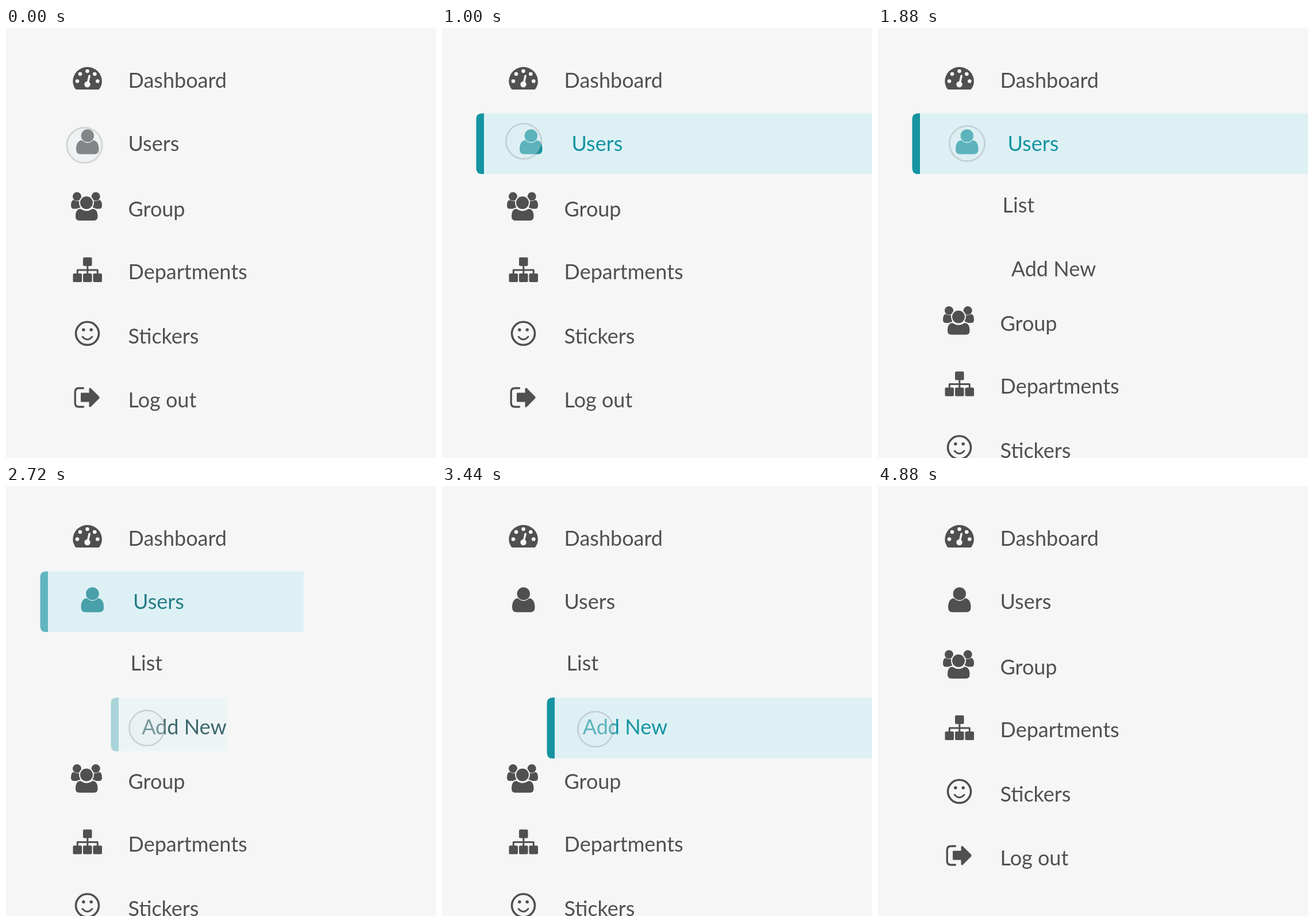
An HTML page that plays this animation: 748 by 748 pixels, repeating every 5.02 s.

```html
<!DOCTYPE html>
<html lang="en">
<head>
<meta charset="utf-8">
<title>Sidebar menu</title>
<style>
  html, body { margin: 0; width: 100%; height: 100%; overflow: hidden; background: #f6f6f6; }
  svg { display: block; width: 100vw; height: 100vh; fill: #505050; font: 36px Lato, sans-serif; }
  .line { fill: none; stroke: #505050; stroke-linecap: round; stroke-linejoin: round; }
  .gap { stroke: #f6f6f6; stroke-width: 2; }
  .hole { fill: #f6f6f6; }
  .bar, #userOn { fill: #1594a1; }
  .wash { fill: #ddf1f5; }
</style>
</head>
<body>
<svg viewBox="0 0 748 748">
  <defs>
    <g id="person">
      <circle cx="141.8" cy="187.4" r="11.2"/>
      <path d="M122 211C122 201 126 195.5 132 195.3Q141.8 204.5 151.5 195.3C157.500 195.500 161.600 201 161.600 211Q161.600 219.500 154 219.500H129.500Q122 219.500 122 211Z"/>
    </g>
  </defs>

  <g id="dashboard">
    <path d="M121.500 107Q116.300 100 116.300 93A25.300 25.300 0 0 1 166.900 93Q166.900 100 161.700 107Z"/>
    <g class="hole">
      <circle cx="124" cy="92.500" r="3.300"/><circle cx="129" cy="80" r="3.300"/>
      <circle cx="141.500" cy="75" r="3.300"/><circle cx="154.300" cy="80" r="3.300"/>
      <circle cx="159.300" cy="92.500" r="3.300"/><circle cx="141.500" cy="98" r="5.200"/>
      <path d="M143.500 82.500Q145.500 80.500 147 83L143.500 98H140Z"/>
    </g>
    <text x="212.500" y="104.300">Dashboard</text>
  </g>

  <rect id="userWash" class="wash" x="73" y="148.500" height="105.500"/>
  <path id="userBar" class="bar" d="M73 148.500H69.500Q59.500 148.500 59.500 158.500V244Q59.500 254 69.500 254H73Z"/>
  <g id="users">
    <use href="#person" id="userOff"/>
    <use href="#person" id="userOn"/>
    <text id="userText" x="212.500" y="214.300">Users</text>
  </g>

  <rect id="addWash" class="wash" x="196" y="368"/>
  <path id="addBar" class="bar"/>
  <g id="submenu">
    <text x="216.500" y="321.300">List</text>
    <text id="addText" y="432.300">Add New</text>
  </g>

  <g id="lower">
    <g id="group">
      <circle cx="123.500" cy="293" r="7.500"/><circle cx="156.200" cy="293" r="7.500"/>
      <path d="M113 309Q113 299 118.500 299.300Q123.500 303 129 300V314.500H118Q113 314.500 113 309Z"/>
      <path d="M167 309Q167 299 161.500 299.300Q156.500 303 151 300V314.500H162Q167 314.500 167 309Z"/>
      <path class="gap" d="M120 328C120 318 124 313.500 130 313.500Q140 321 150 313.500C156 313.500 160.500 318 160.500 328Q160.500 336 153 336H127.500Q120 336 120 328Z"/>
      <circle class="gap" cx="140" cy="304" r="12"/>
      <text x="212.500" y="328.300">Group</text>
    </g>
    <g id="departments">
      <rect x="134" y="399" width="15.500" height="15" rx="2"/>
      <rect x="116.500" y="427" width="15.500" height="15" rx="2"/>
      <rect x="134" y="427" width="15.500" height="15" rx="2"/>
      <rect x="151.500" y="427" width="15.500" height="15" rx="2"/>
      <path class="line" stroke-width="3" d="M141.800 413V428M124.300 428V421H159.300V428"/>
      <text x="212.500" y="437.300">Departments</text>
    </g>
    <g id="stickers">
      <circle class="line" stroke-width="3.600" cx="141.500" cy="531.300" r="20"/>
      <circle cx="134.800" cy="525" r="2.800"/><circle cx="148.200" cy="525" r="2.800"/>
      <path class="line" stroke-width="2.800" d="M133 537Q141.500 546.500 150 537"/>
      <text x="212.500" y="549.300">Stickers</text>
    </g>
    <g id="logout">
      <path class="line" stroke-width="3.400" d="M134.500 626.500H127Q120.200 626.500 120.200 633V652.500Q120.200 659 127 659H134.500"/>
      <path d="M131.500 634.500H144.500V627.500Q145 625 147.500 626.500L162 641Q163.500 642.800 162 644.500L147.500 659Q145 660.500 144.500 658V650.500H131.500Q130 650.500 130 649V636Q130 634.500 131.500 634.500Z"/>
      <text x="212.500" y="660.300">Log out</text>
    </g>
  </g>

  <circle id="cursor" r="30.700" fill="#deecee" fill-opacity=".35" stroke="#808080" stroke-opacity=".28" stroke-width="2.800"/>
</svg>
<script>
const LOOP = 5020, MOVE = 300;
const USERS_HOVER = 357, OPEN = 1350, ADD_HOVER = 2655, CLOSE = 3800;
const GREY = [80, 80, 80], TEAL = [21, 148, 161];

// Pointer path: time, x, y
const path = [
  [0, 136.5, 204], [1000, 142, 197], [1880, 155, 201], [2300, 156, 202],
  [2400, 165, 225], [2500, 188, 285], [2600, 218, 345], [2720, 245, 421],
  [2800, 255, 430], [3000, 264, 425], [3200, 267, 423], [LOOP, 267, 423]
];

const $ = id => document.getElementById(id);
const clamp = v => Math.min(1, Math.max(0, v));
const mix = (a, b, k) => a + (b - a) * k;
const set = (id, attrs) => {
  for (const name in attrs) $(id).setAttribute(name, attrs[name]);
};
const tint = k => `rgb(${GREY.map((c, i) => Math.round(mix(c, TEAL[i], k)))})`;

// cubic-bezier(.25, .1, .25, 1)
function ease(x) {
  const bezier = (a, b, s) => 3 * a * s * (1 - s) ** 2 + 3 * b * s * s * (1 - s) + s ** 3;
  let low = 0, high = 1;
  for (let i = 0; i < 20; i++) {
    const mid = (low + high) / 2;
    if (bezier(.25, .25, mid) < x) low = mid; else high = mid;
  }
  return bezier(.1, 1, low);
}

const after = (t, start) => t <= start ? 0 : t >= start + MOVE ? 1 : ease((t - start) / MOVE);

function pointer(t) {
  const i = path.findIndex(p => p[0] > t);
  const [t0, x0, y0] = path[i - 1], [t1, x1, y1] = path[i];
  const k = (t - t0) / (t1 - t0);
  return [mix(x0, x1, k), mix(y0, y1, k)];
}

function draw(now) {
  const t = now % LOOP;
  const add = after(t, ADD_HOVER);
  const user = after(t, USERS_HOVER) * (1 - add);
  const open = after(t, OPEN) * (1 - after(t, CLOSE));
  const addShown = add * open;

  set('userWash', { width: 675 * user });
  set('userBar', { opacity: user });
  set('users', { transform: `translate(${13 * user} 0)` });
  set('userOff', { opacity: 1 - user });
  set('userOn', { opacity: user });
  set('userText', { fill: tint(user) });

  const bottom = 368 + mix(87, 106, add);
  set('addWash', { width: 552 * addShown, height: bottom - 368, opacity: addShown });
  set('addBar', {
    d: `M196 368H192.500Q182.500 368 182.500 378V${bottom - 10}Q182.500 ${bottom} 192.500 ${bottom}H196Z`,
    opacity: addShown
  });
  set('submenu', { opacity: clamp((open - .2) / .8) });
  set('addText', { x: 231.7 + 13 * add, fill: tint(add) });
  set('lower', { transform: `translate(0 ${198.5 * open})` });

  set('cursor', {
    transform: `translate(${pointer(t)})`,
    opacity: clamp((4880 - t) / 100)
  });
}

function frame(now) {
  draw(now);
  requestAnimationFrame(frame);
}
draw(0);
requestAnimationFrame(frame);
</script>
</body>
</html>
```
